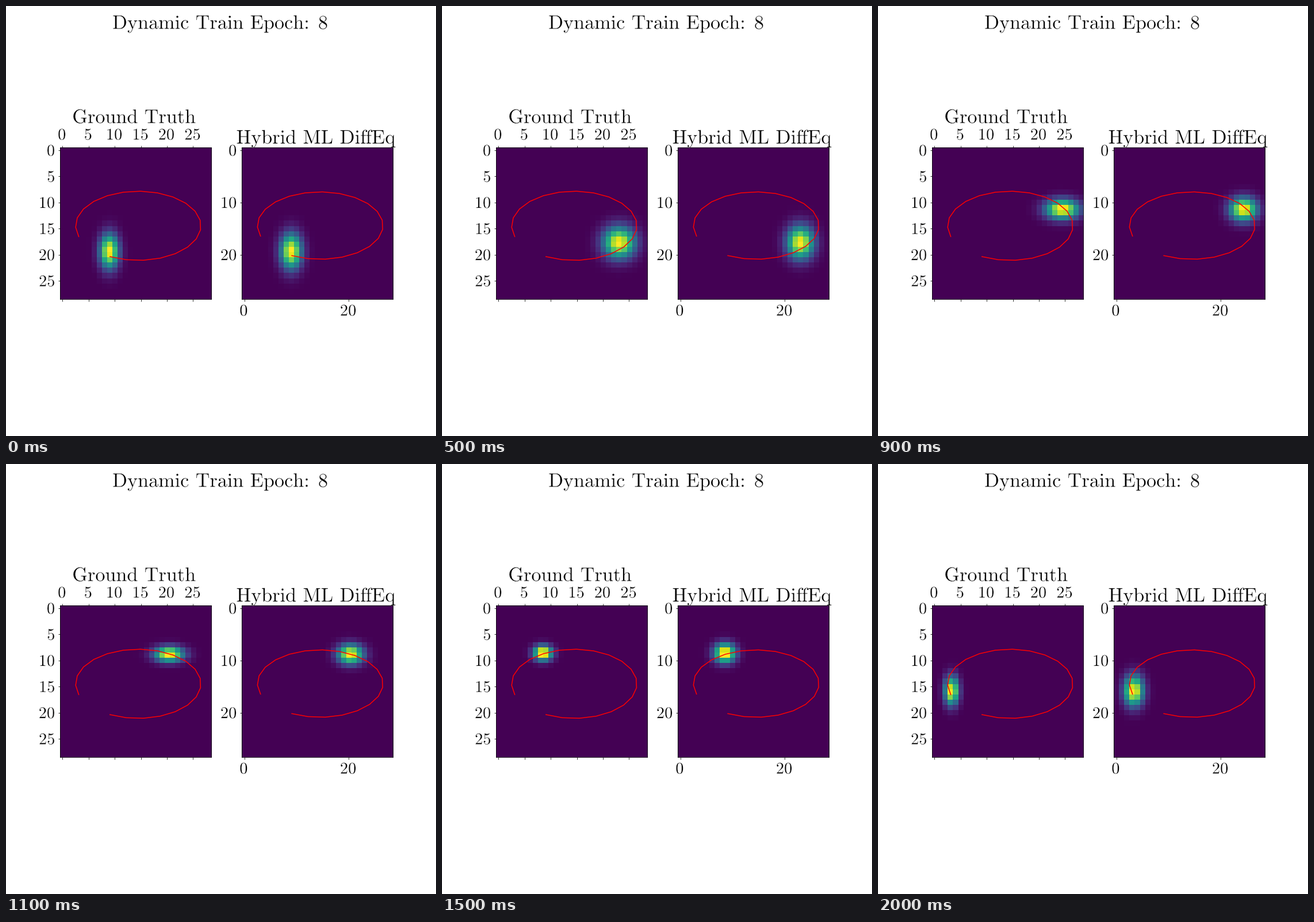
A matplotlib script for the animation above (2100 ms loop, 748x748 px).

```python
import numpy as np
import matplotlib.pyplot as plt
from matplotlib.animation import FuncAnimation
from matplotlib.patheffects import Stroke

SIZE, GRID, STEPS = 748, 29, 21
TITLE, TICK = 34.2, 28.4
GAP, WIDE_GAP = r"\hspace{0.38}", r"\hspace{0.506}"
PHASE, TURN = -0.469, 0.275

# Panel layout in pixels
CELL = 263.5 / GRID
LEFT_X, RIGHT_X, TOP_Y = 93.8, 410, 246.3

plt.rcParams["mathtext.fontset"] = "cm"

# Each quantity is (mean, swing) of one harmonic of the orbit angle
TRUTH = dict(path=((14.5, 12.0), (14.47, 6.62)),
             spot=((14.05, 11.4), (13.9, 6.1)),
             width=((1.55, 0.68), (1.6, 0.72)))
MODEL = dict(path=((14.53, 12.03), (14.43, 6.45)),
             spot=((14.05, 11.3), (13.9, 6.1)),
             width=((1.53, 0.27), (1.78, 0.6)))


def orbit(pair, t):
    """x follows the sine, y the cosine of the orbit angle at step t."""
    a = PHASE + TURN * t
    (mx, sx), (my, sy) = pair
    return mx + sx * np.sin(a), my + sy * np.cos(a)


def blob(p, t):
    """Gaussian spot scaled to a peak of one."""
    i = np.arange(GRID)
    gx, gy = (np.exp(-0.5 * ((i - c) / s) ** 2)
              for c, s in zip(orbit(p["spot"], t), orbit(p["width"], t)))
    z = np.outer(gy, gx)
    return z / z.max()


def label(x, y, s, size, ha="center"):
    """Light text with its baseline y pixels below the top edge."""
    fig.text(x / SIZE, 1 - y / SIZE, f"${s}$", fontsize=size, ha=ha,
             va="baseline", color="black",
             path_effects=[Stroke(linewidth=0.3, foreground="white")])


def words(*parts):
    return GAP.join(rf"\text{{{w}}}" for w in parts)


def at(start, v):
    return start + (v + 0.5) * CELL


def panel(ax, p, x0, xticks, yticks, label_y):
    im = ax.imshow(blob(p, 0), cmap="viridis", vmin=0, vmax=1)
    ax.plot(*orbit(p["path"], np.arange(STEPS)), color="red", lw=1.5)
    ax.set(xlim=(-0.5, GRID - 0.5), ylim=(GRID - 0.5, -0.5),
           xticks=xticks, yticks=yticks)
    ax.tick_params(labelbottom=False, labelleft=False)
    for v in xticks:
        label(at(x0, v) - 0.7, label_y, words(v), TICK)
    for v in yticks:
        label(x0 - 7.8, at(TOP_Y, v) + 9.6, words(v), TICK, "right")
    return im


fig, (left, right) = plt.subplots(1, 2, figsize=(SIZE / 72, SIZE / 72), dpi=72)
fig.subplots_adjust(left=0.1254, right=0.9004, bottom=0.1096, top=0.8796)

fives = range(0, GRID, 5)
images = [
    (panel(left, TRUTH, LEFT_X, fives, fives, 232.5), TRUTH),
    (panel(right, MODEL, RIGHT_X, range(0, GRID, 20), range(0, GRID, 10), 538.6),
     MODEL)]
left.tick_params(axis="x", top=True)

label(372.7, 40,
      words("Dynamic", "Train", "Epoch:") + WIDE_GAP + words("8"), TITLE)
label(223.3, 203.8, words("Ground", "Truth"), TITLE)
label(540, 239.5,
      words("Hybrid", "ML", "Dif") + r"\hspace{-0.033}" + words("fEq"), TITLE)


def update(t):
    for im, p in images:
        im.set_data(blob(p, t))
    return [im for im, _ in images]


anim = FuncAnimation(fig, update, frames=STEPS, interval=100,
                     repeat=True, repeat_delay=0, blit=False)
plt.show()
```
